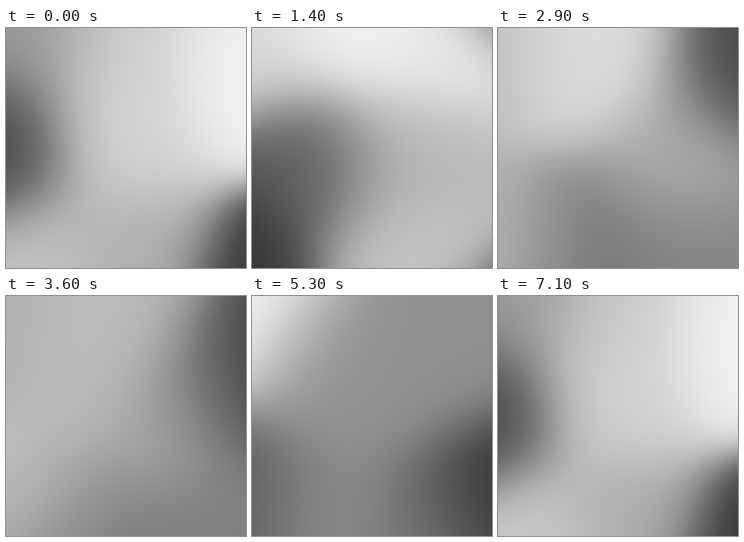
An HTML page with a canvas for the animation above (7200 ms loop, 300 by 300 pixels).

```html
<!DOCTYPE html>
<html lang="en">
<head>
<meta charset="utf-8">
<title>Drifting grey field</title>
<style>
  html, body { margin: 0; width: 100%; height: 100%; overflow: hidden; background: #aaa; }
  canvas { display: block; width: 100vw; height: 100vh; }
</style>
</head>
<body>
<canvas id="stage" width="300" height="300"></canvas>
<script>
const SIZE = 300, LOOP = 7200, STEP = 100, SOFT = 60, LAP = 510;

const canvas = document.getElementById('stage');
const ctx = canvas.getContext('2d');
const image = ctx.createImageData(SIZE, SIZE);
const bell = d => Math.exp(-d * d / (2 * SOFT * SOFT));

// A soft spot of one grey; its bell is split into columns and rows.
function spot(x, y, grey) {
  const cols = new Float64Array(SIZE), rows = new Float64Array(SIZE);
  for (let i = 0; i < SIZE; i++) {
    cols[i] = bell(i - x);
    rows[i] = bell(i - y);
  }
  return { cols, rows, grey };
}

// Every spot follows an ellipse once per loop while its grey swings.
function spotsAt(u) {
  const turn = 2 * Math.PI * u;
  const c = Math.cos(turn), s = Math.sin(turn);
  const c2 = Math.cos(2 * turn), s2 = Math.sin(2 * turn);

  const left   = spot(38 - 52 * c + 52 * s, 222 - 76 * c - 24 * s, 95 - 23 * c + 6 * s);
  const corner = spot(2 + 21 * c, 20 - 20 * c, 198 - 8 * c - 10 * s - 36 * c2 + 5 * s2);
  const light  = spot(214 + 74 * c - 23 * s, 47 + 5 * c - 32 * s, 204 + 28 * c + 43 * s + 12 * c2 - 16 * s2);
  const top    = spot(107 + 47 * c + 7 * s, 42 - 18 * c - 42 * s, 198 + 8 * c + 49 * s);
  const middle = spot(176 - 29 * c + 27 * s, 142 - 9 * c + 19 * s, 176 + 20 * c + 14 * s + 16 * c2);
  const bottom = spot(202 - 50 * c - 9 * s, 290, 152 + 23 * c + 28 * s + 18 * s2);
  const tongue = spot(37 + 3 * c - 53 * s, 277 + 27 * c + 9 * s, 152 - 42 * s + 45 * c2 - 40 * s2);

  // The dark spot sinks along the right edge and re-enters at the top.
  const x = 306 + 21 * c + 16 * s;
  const y = 352 + LAP * u - 12 * c - 34 * s;
  const grey = 60 - 4 * c + 14 * s;
  const sinking = [0, 1].map(lap => spot(x, y - lap * LAP, grey));

  return [left, corner, light, top, middle, bottom, tongue, ...sinking];
}

function draw(t) {
  const spots = spotsAt(t / LOOP);
  const data = image.data;
  for (let y = 0, o = 0; y < SIZE; y++) {
    for (let x = 0; x < SIZE; x++, o += 4) {
      let sum = 0, weight = 0;
      for (const p of spots) {
        const w = p.cols[x] * p.rows[y];
        weight += w;
        sum += w * p.grey;
      }
      data[o] = data[o + 1] = data[o + 2] = sum / weight;
      data[o + 3] = 255;
    }
  }
  ctx.putImageData(image, 0, 0);
}

const start = performance.now();
let shown = -1;
function tick() {
  const t = Math.floor((performance.now() - start) % LOOP / STEP) * STEP;
  if (t !== shown) draw(shown = t);
  requestAnimationFrame(tick);
}
tick();
</script>
</body>
</html>
```
